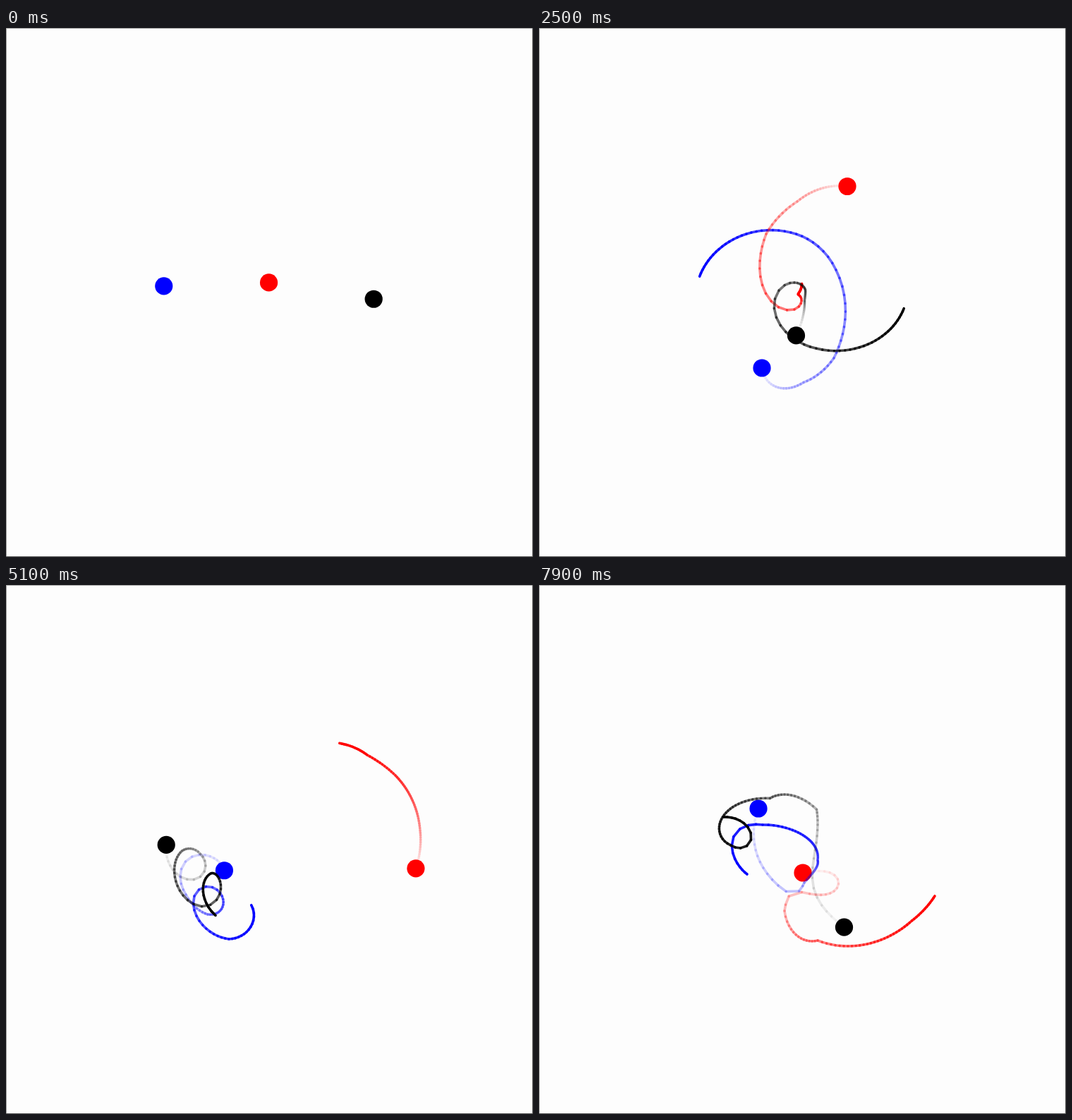
An HTML page with a canvas that plays this animation: 747 by 750 pixels, repeating every 8 s.

```html
<!DOCTYPE html>
<html lang="en">
<head>
<meta charset="utf-8">
<title>Three bodies</title>
<style>
html, body { margin: 0; width: 100%; height: 100%; overflow: hidden; background: #fdfdfd; }
canvas { display: block; }
</style>
</head>
<body>
<canvas id="stage" width="747" height="750"></canvas>
<script>
const ctx = document.getElementById('stage').getContext('2d');
const LOOP = 8000, FRAME = 100;     // ms
const RATE = 30, SUBSTEPS = 8;      // trail steps per second, integration steps per trail step
const FIRST_STEP = -2;
const GRAVITY = 4.3e6, SOFTENING = 9;
const SUM_X = 1117.5, SUM_Y = 1111, DRIFT = 12.55;   // summed positions and vertical speed
const COLORS = ['#00f', '#f00', '#000'];
const RADIUS = 12.6;

// Key poses: trail step, blue x and y, red x and y. Gravity moves the bodies between them.
const poses = [
  [-2, 222.5, 375, 372.5, 360], [27, 357, 290, 367.5, 378], [36, 421, 343, 362, 399],
  [48, 418, 468, 322, 292], [57, 375, 502.5, 366, 246], [75, 316, 482, 437, 224.5],
  [99, 316, 502, 512, 241], [111, 267, 441, 552, 270], [129, 286, 467, 582, 321],
  [137, 255, 439, 587, 348], [156, 309, 411, 577, 412], [165, 295, 410, 561, 441],
  [177, 317, 340, 528.5, 476], [204, 395, 390, 395, 504], [218, 376, 422, 348, 462],
  [237, 311, 317, 374, 408]
];

// Momentum is conserved, so two bodies fix the third
const withThird = ([ax, ay, bx, by], sumX, sumY) => [ax, ay, bx, by, sumX - ax - bx, sumY - ay - by];
const place = ([step, ...pair]) => withThird(pair, SUM_X, SUM_Y + DRIFT * step / RATE);

function kick(pos, vel, dt) {
  for (let i = 0; i < 6; i += 2) {
    for (let j = i + 2; j < 6; j += 2) {
      const dx = pos[j] - pos[i], dy = pos[j + 1] - pos[i + 1];
      const pull = GRAVITY * dt / (dx * dx + dy * dy + SOFTENING) ** 1.5;
      vel[i] += pull * dx;
      vel[i + 1] += pull * dy;
      vel[j] -= pull * dx;
      vel[j + 1] -= pull * dy;
    }
  }
}

// Leapfrog integration from a pose with the given blue and red velocities
function fly(from, launch, steps) {
  const pos = [...from], vel = withThird(launch, 0, DRIFT), track = [from];
  const dt = 1 / RATE / SUBSTEPS;
  for (let s = 1; s <= steps * SUBSTEPS; s++) {
    kick(pos, vel, dt / 2);
    for (let c = 0; c < 6; c++) pos[c] += vel[c] * dt;
    kick(pos, vel, dt / 2);
    if (s % SUBSTEPS === 0) track.push([...pos]);
  }
  return { track, pos, vel };
}

// Gaussian elimination of a small symmetric positive system
function solve(m, b) {
  const n = b.length, rows = m.map((row, i) => [...row, b[i]]);
  for (let i = 0; i < n; i++) {
    for (let k = 0; k < n; k++) {
      if (k === i) continue;
      const f = rows[k][i] / rows[i][i];
      for (let c = i; c <= n; c++) rows[k][c] -= f * rows[i][c];
    }
  }
  return rows.map((row, i) => row[n] / row[i]);
}

const dot = (a, b) => a.reduce((sum, x, i) => sum + x * b[i], 0);

// Damped least squares: find the launch velocities that arrive at the next pose
function aim(from, to, guess, steps) {
  const miss = v => fly(from, v, steps).pos.slice(0, 4).map((x, c) => x - to[c]);
  let v = guess, error = miss(v), cost = dot(error, error), damping = .05;
  for (let round = 0; round < 20 && cost > .05; round++) {
    const columns = v.map((_, c) => {
      const nudged = miss(v.map((x, i) => i === c ? x + .01 : x));
      return nudged.map((x, i) => (x - error[i]) / .01);
    });
    const normal = columns.map((a, i) => columns.map((b, j) => dot(a, b) + (i === j ? damping : 0)));
    const change = solve(normal, columns.map(a => -dot(a, error)));
    const next = v.map((x, i) => x + change[i]);
    const nextError = miss(next), nextCost = dot(nextError, nextError);
    if (nextCost < cost) {
      v = next;
      error = nextError;
      cost = nextCost;
      damping /= 5;
    } else {
      damping *= 4;
    }
  }
  return { v, cost };
}

function bestLaunch(from, to, velocity, steps) {
  const chord = velocity.map((_, c) => (to[c] - from[c]) * RATE / steps);
  const guesses = [1, .85, 1.15].map(k => velocity.map(x => x * k));
  let best = { cost: Infinity };
  for (const guess of [...guesses, chord]) {
    const found = aim(from, to, guess, steps);
    if (found.cost < best.cost) best = found;
    if (best.cost < .25) break;
  }
  return best.v;
}

function buildTrack() {
  const track = [place(poses[0])];
  let velocity = [0, -130, 0, 13];
  for (let k = 1; k < poses.length; k++) {
    const from = place(poses[k - 1]), to = place(poses[k]);
    const steps = poses[k][0] - poses[k - 1][0];
    const flight = fly(from, bestLaunch(from, to, velocity, steps), steps);
    // Spread any remaining miss over the flight
    for (let s = 1; s <= steps; s++) {
      track.push(flight.track[s].map((x, c) => x + (to[c] - flight.pos[c]) * s / steps));
    }
    velocity = flight.vel.slice(0, 4);
  }
  return track;
}

const track = buildTrack();
const point = (body, i) => track[i].slice(2 * body, 2 * body + 2);

function drawBall(body, head) {
  ctx.fillStyle = COLORS[body];
  ctx.beginPath();
  ctx.arc(...point(body, head), RADIUS, 0, 2 * Math.PI);
  ctx.fill();
}

// The trail is opaque at its old end and fades towards the body
function drawTrail(body, tail, head) {
  ctx.strokeStyle = COLORS[body];
  for (let i = tail; i < head; i++) {
    ctx.globalAlpha = 1 - (i - tail) / (head - tail);
    ctx.beginPath();
    ctx.moveTo(...point(body, i));
    ctx.lineTo(...point(body, i + 1));
    ctx.stroke();
  }
  ctx.globalAlpha = 1;
}

function drawBorder() {
  ctx.fillStyle = '#a0a0a0';
  ctx.fillRect(0, 0, 747, 1);
  ctx.fillRect(0, 0, 1, 750);
  ctx.fillStyle = '#505050';
  ctx.fillRect(746, 0, 1, 750);
  ctx.fillRect(0, 749, 747, 1);
}

function draw(t) {
  const span = Math.min(2.4, 2.2 + .07 * (t - 6) ** 2);
  const head = Math.round(t * RATE) - FIRST_STEP;
  const tail = Math.max(0, head - Math.round(span * RATE));
  ctx.fillStyle = '#fdfdfd';
  ctx.fillRect(0, 0, 747, 750);
  ctx.lineWidth = 3.6;
  ctx.lineCap = 'round';
  for (let body = 0; body < 3; body++) drawBall(body, head);
  for (let body = 0; body < 3; body++) drawTrail(body, tail, head);
  drawBorder();
}

const start = performance.now();
function tick() {
  const ms = (performance.now() - start) % LOOP;
  draw(Math.floor(ms / FRAME) * FRAME / 1000);
  requestAnimationFrame(tick);
}
tick();
</script>
</body>
</html>
```
